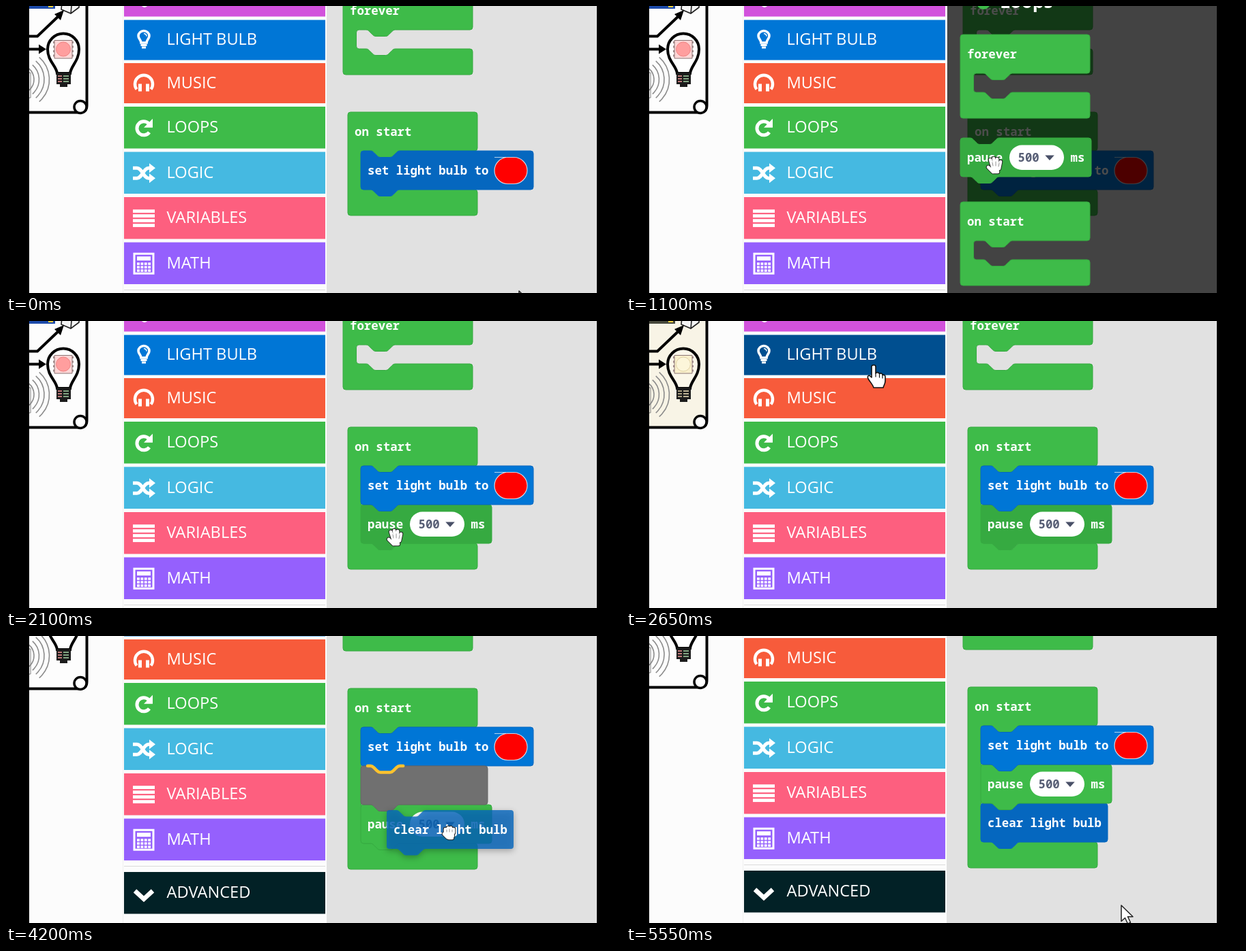
Recreate the animation shown at these times as an HTML page with a canvas. Size 900x422 px, loop 5950 ms.

```html
<!DOCTYPE html>
<html lang="en">
<head>
<meta charset="utf-8">
<title>Block editor</title>
<style>
html, body { margin: 0; width: 100%; height: 100%; overflow: hidden; background: #000; }
canvas { display: block; }
</style>
</head>
<body>
<canvas id="stage" width="900" height="422"></canvas>
<script>
const ctx = document.getElementById('stage').getContext('2d');
const LOOP = 5950, STEP = 50;
const MONO = 'bold 17.4px "Noto Sans Mono", monospace';
const FIELD = MONO.replace('bold', '600');
const SANS = '"Open Sans", sans-serif';
const GREEN = '#3ebb49', BLUE = '#0076d6';
const DARK = { [GREEN]: '#36aa41', [BLUE]: '#0567bf' };

// ---------- helpers ----------
const clamp = (v) => Math.max(0, Math.min(1, v));
const smooth = (p) => p * p * (3 - 2 * p);
const within = (t, a, b) => t >= a && t < b;

function text(s, x, y, font = MONO, color = '#fff', align = 'left') {
  ctx.font = font;
  ctx.fillStyle = color;
  ctx.textAlign = align;
  ctx.fillText(s, x, y);
}
function rect(x, y, w, h, color) {
  ctx.fillStyle = color;
  ctx.fillRect(x, y, w, h);
}
function paint(path, fill, stroke, width = 1) {
  const p = typeof path === 'string' ? new Path2D(path) : path;
  if (fill) { ctx.fillStyle = fill; ctx.fill(p); }
  if (stroke) { ctx.strokeStyle = stroke; ctx.lineWidth = width; ctx.stroke(p); }
}
function disc(x, y, r, fill, stroke, width) {
  const p = new Path2D();
  p.arc(x, y, r, 0, 7);
  paint(p, fill, stroke, width);
}
function pill(x, y, w, h, fill, stroke, width) {
  const p = new Path2D();
  p.roundRect(x, y, w, h, Math.min(w, h) / 2);
  paint(p, fill, stroke, width);
}
function caret(x, y, color) {
  paint(`M${x - 4.5} ${y - 2.5}h9l-4.5 5z`, color, color, 2);
}

// ---------- blocks ----------
const NOTCH = 'c2.4 0 3.6 1.2 4.8 2.4l4.7 4.7c1.2 1.2 2.4 2.4 4.8 2.4h14.3c2.4 0 3.6-1.2 4.8-2.4l4.7-4.7c1.2-1.2 2.4-2.4 4.8-2.4';
const TAB = 'c-2.4 0-3.6 1.2-4.8 2.4l-4.7 4.7c-1.2 1.2-2.4 2.4-4.8 2.4h-14.3c-2.4 0-3.6-1.2-4.8-2.4l-4.7-4.7c-1.2-1.2-2.4-2.4-4.8-2.4';
const TR = 'a4 4 0 0 1 4 4', BR = 'a4 4 0 0 1-4 4', BL = 'a4 4 0 0 1-4-4', TL = 'a4 4 0 0 1 4-4';
const ROW = 57, ARM = 19.5, BASE = 35.4;

function statementPath(x, y, w) {
  return `M${x} ${y + 4}${TL}H${x + 14.3}${NOTCH}H${x + w - 4}${TR}V${y + ROW - 4}${BR}` +
    `H${x + 57.2}${TAB}H${x + 4}${BL}z`;
}
function container(label, x, y, inner = 28, w = 190) {
  const top = y + ROW, base = top + inner, ix = x + ARM;
  paint(`M${x} ${y + 4}${TL}H${x + w - 4}${TR}V${top - 4}${BR}H${ix + 57.2}${TAB}H${ix + 4}` +
    `a4 4 0 0 0-4 4V${base - 4}a4 4 0 0 0 4 4H${ix + 14.3}${NOTCH}H${x + w - 4}${TR}` +
    `V${base + 34}${BR}H${x + 4}${BL}z`, GREEN, DARK[GREEN]);
  text(label, x + 10, y + BASE);
}
const BLOCKS = {
  set: {
    w: 253, color: BLUE, label: 'set light bulb to',
    extra(x, y) {
      pill(x + 196, y + 9.5, 48, 39, '#f00', 'rgba(255,255,255,.75)', 1.2);
      rect(x + 196, y + 9, 17, 1, 'rgba(255,255,255,.7)');
    }
  },
  pause: {
    w: 192, color: GREEN, label: 'pause',
    extra(x, y) {
      pill(x + 72, y + 10.5, 80, 36.5, '#fff');
      text('500', x + 84.5, y + BASE, FIELD, '#575e75');
      caret(x + 131, y + 29, '#4a5168');
      text('ms', x + 161.5, y + BASE);
    }
  },
  clear: { w: 186, color: BLUE, label: 'clear light bulb' },
  bright: {
    w: 222, color: BLUE, label: 'set brightness',
    extra(x, y) {
      pill(x + 165, y + 10, 47, 37, '#fff');
      text('15', x + 188.5, y + BASE, FIELD, '#575e75', 'center');
    }
  }
};
function block(id, x, y, active) {
  const b = BLOCKS[id];
  paint(statementPath(x, y, b.w), active ? DARK[b.color] : b.color, DARK[b.color]);
  text(b.label, x + 10, y + BASE);
  if (b.extra) b.extra(x, y);
}
function marker(x, y, w) {
  paint(statementPath(x, y, w), '#707070', '#666');
  ctx.lineCap = 'round';
  paint(`M${x + 10} ${y}h4.300${NOTCH}h5`, null, '#fdc22e', 4.5);
  ctx.lineCap = 'butt';
}
function ghost(id, x, y) {
  const b = BLOCKS[id];
  ctx.save();
  ctx.globalAlpha = 0.8;
  ctx.save();
  ctx.shadowColor = 'rgba(0,0,0,.35)';
  ctx.shadowBlur = 10;
  ctx.shadowOffsetY = 3;
  paint(statementPath(x, y, b.w), DARK[b.color]);
  ctx.restore();
  if (b.extra) b.extra(x, y);
  ctx.globalAlpha = 1;
  text(b.label, x + 10, y + BASE);
  ctx.restore();
}

// ---------- toolbox ----------
const line = (d, w = 4) => paint(d, null, '#fff', w);
const ICONS = {
  bulb() {
    line('M-4 4C-4 0-8-2-8-6A8 7.500 0 0 1 8-6C8-2 4 0 4 4z', 3.6);
    line('M-4.500 7.500H4.500M-3 11H3', 3.2);
    line('M0-9.500Q4-9 4-5.500', 1.5);
  },
  phones() {
    line('M-10.500 9A13 13 0 1 1 10.500 9', 4.5);
    line('M-5.500 1V12M5.500 1V12', 5);
  },
  redo() {
    line('M8 7A10 10 0 1 1 7-6', 5);
    paint('M13-13V0H0z', '#fff');
  },
  shuffle() {
    line('M-16-7H-10C-3-7 0 8 7 8H9M-16 8H-10C-3 8 0-7 7-7H9', 5);
    paint('M8-14L17-7 8 0zM8 1L17 8 8 15z', '#fff');
  },
  bars() {
    for (let i = 0; i < 4; i++) rect(-16, -12.5 + i * 7, 32, 4.8, '#fff');
  },
  calc() {
    line('M-14-14H14V15H-14z', 3);
    rect(-10, -10, 20, 6, '#fff');
    for (let i = 0; i < 12; i++) rect(-10 + (i % 4) * 5.4, -1 + Math.floor(i / 4) * 5, 3.9, 3.6, '#fff');
  },
  chevron() { line('M-13-3L0 9 13-3', 6.5); }
};
const MENU = [
  ['', -43, 58.5, '#d252dc'],
  ['LIGHT BULB', 20.5, 59, '#0076d6', 'bulb'],
  ['MUSIC', 84, 59, '#f75b3b', 'phones'],
  ['LOOPS', 148, 61.5, '#3ebb49', 'redo'],
  ['LOGIC', 214.5, 61.5, '#45b9e1', 'shuffle'],
  ['VARIABLES', 281, 61.5, '#fd5f7f', 'bars'],
  ['MATH', 347.5, 61.5, '#9560fd', 'calc'],
  ['ADVANCED', 426, 61.5, '#022126', 'chevron']
];
function toolbox(cur) {
  rect(171, -10, 1, 520, '#f0f0f0');
  for (const [name, y, h, color, icon] of MENU) {
    rect(173, y, 295, h, color);
    if (icon && cur.kind === 'point' && cur.y >= y && cur.y < y + h) {
      rect(173, y, 295, h, 'rgba(0,0,0,.33)');
    }
    const mid = y + h / 2;
    text(name, 235.5, mid + 7.3, '500 23.6px ' + SANS);
    if (!icon) { disc(203, -3, 5, '#fff'); continue; }
    ctx.save();
    ctx.translate(202, mid);
    ICONS[icon]();
    ctx.restore();
  }
  rect(173, 417, 295, 1, '#dadada');
}

// ---------- simulator ----------
function board(tint) {
  ctx.save();
  ctx.beginPath();
  ctx.rect(34, 0, 90, 170);
  ctx.clip();
  const mix = (a, b) => a.map((v, i) => Math.round(v + (b[i] - v) * tint));
  const rgb = (a, b) => `rgb(${mix(a, b)})`;
  paint('M20-10H118.500V146Q118.500 156.500 108 156.500H20z', rgb([253, 253, 253], [248, 244, 230]), '#000', 4);
  disc(109, 148.5, 9, '#fff', '#000', 3.5);
  rect(34, 0, 38, 4, rgb([28, 74, 170], [70, 72, 60]));
  rect(62, 0, 7, 2, '#f0d040');
  paint('M82-6L81 5 95 11 107 2V-6M95 11L96 0', '#f4f4f4', '#222', 1.6);
  paint('M30 44.500H46L80 12', null, '#000', 4);
  paint('M85 6L71 12 80 21z', '#000');
  paint('M30 63.500H50', null, '#000', 4);
  paint('M59 63.500L48 56.500V70.500z', '#000');
  for (let i = 0; i < 4; i++) {
    const p = new Path2D();
    p.arc(20, 108, 21 + i * 7.5, -0.85, 0.85);
    paint(p, null, '#8b8b8b', 1.6);
  }
  paint('M34 98H36V135H34', null, '#777', 1);
  paint('M75 99C74 88 61 81 61 63.500A23 23 0 0 1 107 63.500C107 81 95 88 94 99z',
    rgb([255, 255, 255], [251, 247, 234]), '#000', 4);
  rect(74, 98, 21, 17, '#1c1c1c');
  rect(79, 114, 11, 5, '#1c1c1c');
  for (let i = 0; i < 3; i++) {
    rect(76, 102 + i * 4, 6, 2, rgb([190, 120, 120], [170, 160, 130]));
    rect(84, 102 + i * 4, 8, 2, rgb([130, 165, 130], [190, 180, 150]));
  }
  for (let i = 0; i < 4; i++) rect(69, 52 + i * 6.5, 30, 3, '#a58f8f');
  paint('M71 50.500H97V77H71z', rgb([253, 214, 214], [250, 240, 205]), '#8a7474', 1);
  disc(84, 63.5, 10.5, rgb([255, 158, 158], [252, 246, 218]), rgb([240, 130, 130], [225, 210, 165]), 1);
  ctx.restore();
}

// ---------- flyout ----------
function flyout(kind, hover) {
  rect(471, 0, 395, 422, 'rgba(0,0,0,.7)');
  const title = (s, x, color) => {
    disc(x - 24, -5, 10, color);
    text(s, x, 3, 'bold 26.5px ' + SANS);
  };
  if (kind === 'loops') {
    title('Loops', 548, GREEN);
    container('forever', 490, 42);
    block('pause', 490, 194, hover);
    container('on start', 490, 288);
    return;
  }
  title('Light bulb', 546, BLUE);
  block('set', 490, 42);
  block('clear', 490, 137, hover);
  pill(490, 231, 197, 48, BLUE, DARK[BLUE]);
  text('dim', 504, 261);
  pill(546, 237, 80, 36, null, '#0a69bd', 1);
  text('red', 558, 261);
  caret(604, 256, '#fff');
  pill(636, 237, 47, 37, '#fff');
  text('1', 659, 261, FIELD, '#575e75', 'center');
  block('bright', 490, 307);
  text('Colors', 489, 413, 'bold 18px ' + SANS);
}

// ---------- cursor ----------
const TRACK = [
  [0, 752, 419], [450, 330, 190], [850, 330, 190], [1100, 540, 235], [1300, 540, 235],
  [1350, 538, 240], [1550, 657, 325], [1900, 570, 319], [2350, 570, 319], [2650, 363, 65],
  [3250, 363, 65], [3450, 622, 191], [3850, 622, 191], [3900, 583, 172], [4200, 649, 289],
  [4400, 614, 283], [4650, 614, 283], [5100, 726, 396], [LOOP, 726, 396]
];
function cursorAt(t, drag) {
  const i = Math.max(1, TRACK.findIndex((k) => k[0] >= t));
  const [t0, x0, y0] = TRACK[i - 1], [t1, x1, y1] = TRACK[i];
  const p = smooth(clamp((t - t0) / (t1 - t0)));
  const x = x0 + (x1 - x0) * p, y = y0 + (y1 - y0) * p;
  let kind = 'arrow';
  if (drag || within(t, 3400, 3900)) kind = 'fist';
  else if (x > 173 && x < 468) kind = 'point';
  else if (within(t, 1050, 1350) || within(t, 2100, 2400) || within(t, 4500, 4750)) kind = 'hand';
  return { x, y, kind };
}
function drawCursor({ x, y, kind }) {
  ctx.save();
  ctx.translate(x, y);
  ctx.lineJoin = ctx.lineCap = 'round';
  if (kind === 'arrow') {
    paint('M0 0V23.500l5.500-5 4 8.500 4-1.800-4-8.400H17z', '#fff', '#222', 1.5);
  } else if (kind === 'point') {
    paint('M-3 2C-3-1 3-1 3 2V12C4 10 8 10 8.500 13C10 11 13 12 13 14.500C15 13.500 17 14.500 17 17V23' +
      'C17 27 15 29 14 33H0C-1 29-5 25-8 20C-10 16-7 14-5 16L-3 18z', '#fff', '#111', 1.6);
    paint('M3 12V17M8.500 14V18M13 15V19', null, '#111', 1.2);
  } else {
    const d = kind === 'hand'
      ? 'M-2 4L-6-9M1 3L-1-11M4 3L4-10M7 4L9-6M-9 2L-2 9M0 6H5M0 9H5'
      : 'M-5 0V-5M-1 0V-7M3 0V-7M7 0V-5M-7 2L-2 7M-2 2H6M-2 5H6M0 8H5';
    paint(d, null, '#222', 6.5);
    paint(d, null, '#fff', 4.6);
    paint(kind === 'hand' ? 'M-2 0L-3-5M2 0V-6M6 1L7-4' : 'M-3-1V-4M1-1V-5M5-1V-4', null, '#777', 0.8);
  }
  ctx.restore();
}

// ---------- scene ----------
function stateAt(t) {
  const s = { stack: ['set'], sel: null, drag: null, slot: -1, fly: null };
  if (t >= 2100) s.stack.push('pause');
  if (t >= 4500) s.stack.push('clear');
  if (within(t, 500, 1350)) s.fly = 'loops';
  if (within(t, 2950, 3900)) s.fly = 'bulb';
  if (within(t, 1350, 2100)) s.drag = { id: 'pause', dx: 46, dy: 46 };
  if (within(t, 3900, 4500)) s.drag = { id: 'clear', dx: 91, dy: 33 };
  if (s.drag) {
    if (within(t, 1400, 1700)) s.slot = 0;
    else if (within(t, 1700, 2100) || within(t, 4000, 4300)) s.slot = 1;
    else if (t >= 4300) s.slot = 2;
  } else if (!s.fly) s.sel = s.stack[s.stack.length - 1];
  s.scroll = Math.round(81 * (1 - Math.pow(1 - clamp((t - 3950) / 350), 3)));
  s.tint = t < 3900
    ? clamp((t - 2450) / 150) * clamp((2850 - t) / 100)
    : clamp((t - 4850) / 150) * clamp((5550 - t) / 100);
  return s;
}
function workspace(s) {
  const items = s.stack.slice();
  if (s.slot >= 0) items.splice(s.slot, 0, 'marker');
  container('forever', 494, -22);
  container('on start', 501, 156, items.length * ROW);
  for (let i = items.length - 1; i >= 0; i--) {
    const id = items[i];
    if (id !== 'marker') block(id, 520, 213 + i * ROW, id === s.sel);
  }
  if (s.slot >= 0) marker(520, 213 + s.slot * ROW, BLOCKS[s.drag.id].w);
}
function draw(t) {
  const s = stateAt(t), cur = cursorAt(t, s.drag);
  rect(0, 0, 900, 422, '#000');
  rect(34, 0, 436, 422, '#fcfcfc');
  rect(470, 0, 396, 422, '#e1e1e1');
  ctx.save();
  ctx.beginPath();
  ctx.rect(34, 0, 832, 422);
  ctx.clip();
  ctx.save();
  ctx.translate(0, -s.scroll);
  board(s.tint);
  toolbox(cur);
  workspace(s);
  ctx.restore();
  if (s.fly) flyout(s.fly, cur.kind === 'hand' || cur.kind === 'fist');
  if (s.drag) ghost(s.drag.id, cur.x - s.drag.dx, cur.y - s.drag.dy);
  drawCursor(cur);
  ctx.restore();
}

const start = performance.now();
function tick() {
  const t = (performance.now() - start) % LOOP;
  draw(Math.floor(t / STEP) * STEP);
  requestAnimationFrame(tick);
}
tick();
</script>
</body>
</html>
```
